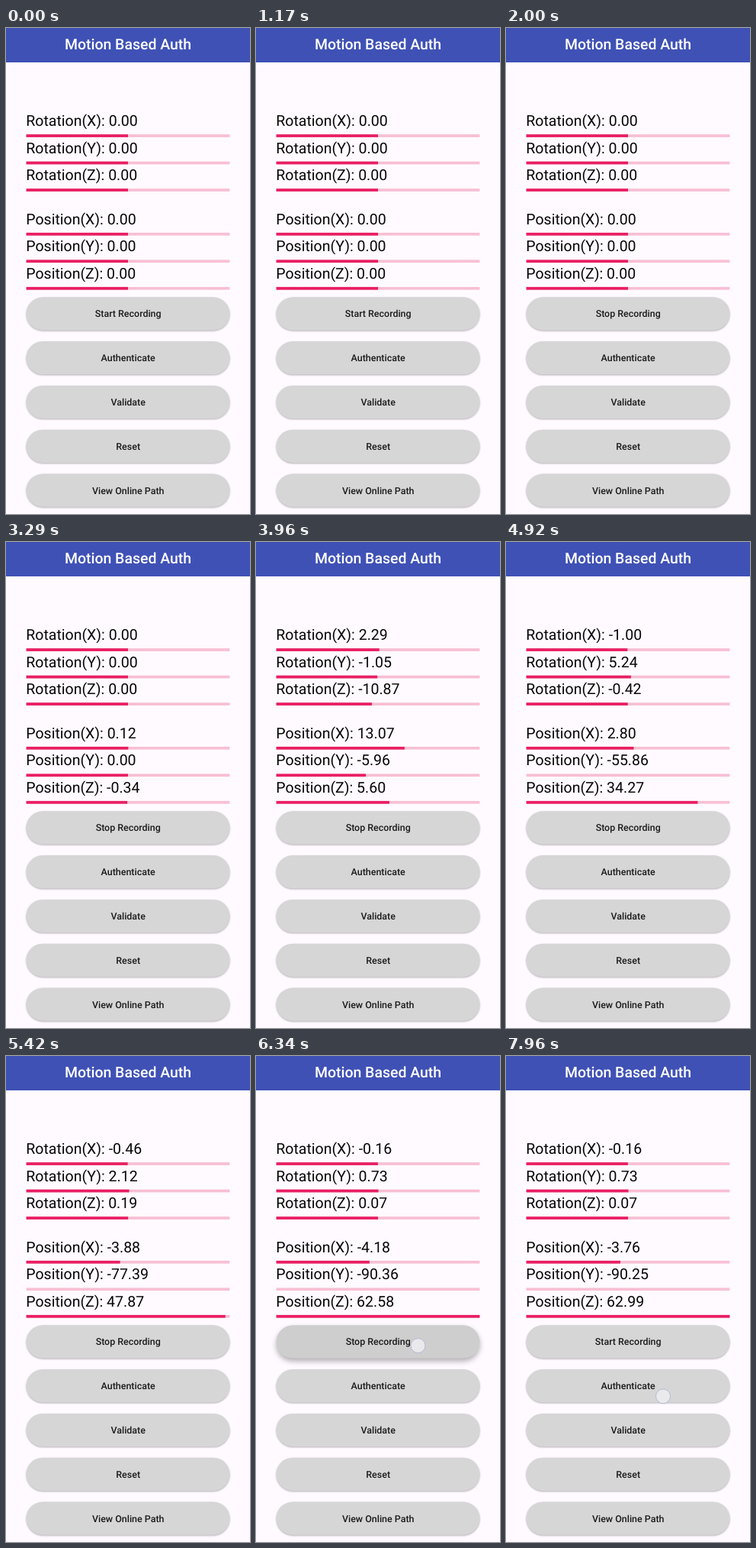
Recreate the animation shown at these times as an HTML page. Size 320x636 px, loop 8 s.

```html
<!DOCTYPE html>
<html lang="en">
<head>
<meta charset="utf-8">
<title>Motion Based Auth</title>
<style>
  html, body { margin: 0; height: 100%; overflow: hidden; background: #fffaff; }
  svg { display: block; width: 100vw; height: 100vh; font-family: Roboto, sans-serif; text-rendering: geometricPrecision; }
  .title { font-size: 19.45px; font-weight: 500; fill: #fff; text-anchor: middle; }
  .value { font-size: 19.5px; fill: #060606; }
  .label { font-size: 12.45px; font-weight: 500; fill: #1b1b1b; text-anchor: middle; }
  .button { fill: #d6d6d6; filter: drop-shadow(0 1px 1.3px rgba(0, 0, 0, .3)); }
</style>
</head>
<body>
<svg viewBox="0 0 320 636">
  <rect width="320" height="45" fill="#3f51b5"/>
  <text class="title" x="160" y="27.7">Motion Based Auth</text>
</svg>
<script>
const LOOP = 8000, STEP = 41.7;
const LEFT = 26.6, WIDTH = 266.8;
const svg = document.querySelector('svg');

function add(tag, attrs, text = '') {
  const el = document.createElementNS(svg.namespaceURI, tag);
  for (const name in attrs) el.setAttribute(name, attrs[name]);
  el.textContent = text;
  svg.append(el);
  return el;
}

// Each meter runs from -range to +range.
const meters = ['Rotation', 'Position'].flatMap((kind, group) =>
  ['X', 'Y', 'Z'].map((axis, i) => {
    const y = 128 + group * 128.7 + i * 35.5;
    const bar = { x: LEFT, y: y + 11.2, width: WIDTH, height: 3.7 };
    add('rect', { ...bar, fill: '#f8bfd4' });
    return {
      name: `${kind}(${axis}): `,
      range: group ? 50 : 180,
      bar: add('rect', { ...bar, fill: '#e91e63' }),
      text: add('text', { class: 'value', x: 26.3, y })
    };
  }));

const buttons = ['Start Recording', 'Authenticate', 'Validate', 'Reset', 'View Online Path']
  .map((name, i) => {
    const y = 352.3 + i * 57.8;
    return {
      rect: add('rect', { class: 'button', x: LEFT, y, width: WIDTH, height: 43.2, rx: 21.6 }),
      text: add('text', { class: 'label', x: 160.2, y: y + 26.1 }, name)
    };
  });
const record = buttons[0];
const dot = add('circle', { r: 9.5, fill: '#ececee', 'fill-opacity': .9, stroke: '#b4b9d6' });

// Step, then rotation x y z and position x y z
const keys = [
  [69, 0, 0, 0, 0, 0, 0],
  [79, 0, 0, 0, .12, 0, -.34],
  [84, 0, 0, 0, .9, -.2, .3],
  [92, 1.6, -.7, -7.4, 9.2, -3.6, 3.8],
  [104, 3.88, -1.94, -19.28, 22.43, -17.87, 12.95],
  [118, -1, 5.24, -.42, 2.8, -55.86, 34.27],
  [132, -.4, 1.8, .2, -4.1, -79.4, 49.6],
  [152, -.16, .73, .07, -4.18, -90.36, 62.58],
  [155, -.16, .73, .07, -3.76, -90.25, 62.99]
];

const taps = [
  { x: 212, y: 379, from: 34, to: 39, held: true },
  { x: 212.5, y: 379, from: 149, to: 155, held: true },
  { x: 206, y: 445.3, from: 188, to: 192 }
];

const clamp = (v, lo, hi) => Math.min(hi, Math.max(lo, v));

function slope(i, col) {
  if (i < 1 || i > keys.length - 2) return 0;
  const rate = j => (keys[j + 1][col] - keys[j][col]) / (keys[j + 1][0] - keys[j][0]);
  const a = rate(i - 1), b = rate(i);
  return a * b > 0 ? 2 * a * b / (a + b) : 0;
}

// Monotone cubic interpolation
function valueAt(step, col) {
  const last = keys.length - 1;
  if (step <= keys[0][0]) return keys[0][col];
  if (step >= keys[last][0]) return keys[last][col];
  const i = keys.findIndex(k => k[0] > step) - 1;
  const [a, b] = [keys[i], keys[i + 1]];
  const h = b[0] - a[0], u = (step - a[0]) / h, w = 1 - u;
  return a[col] * (1 + 2 * u) * w * w + b[col] * u * u * (3 - 2 * u)
    + h * u * w * (slope(i, col) * w - slope(i + 1, col) * u);
}

function draw(now) {
  const step = Math.floor(now % LOOP / STEP + .2);

  meters.forEach(({ name, range, bar, text }, i) => {
    const v = valueAt(step, i + 1);
    text.textContent = name + v.toFixed(2);
    bar.setAttribute('width', WIDTH * clamp((v / range + 1) / 2, 0, 1));
  });

  const recording = step >= taps[0].to && step < taps[1].to;
  record.text.textContent = (recording ? 'Stop' : 'Start') + ' Recording';

  let press = 0;
  for (const { from, to, held } of taps)
    if (held) press = Math.max(press, clamp(Math.min((step - from) / 3, (to + 2 - step) / 3), 0, 1));
  const gray = 214 - 8 * press;
  record.rect.style.fill = `rgb(${gray}, ${gray}, ${gray})`;
  record.rect.style.filter =
    `drop-shadow(0 ${1 + 3 * press}px ${1.3 + 2.5 * press}px rgba(0, 0, 0, .3))`;

  const tap = taps.find(({ from, to }) => step >= from && step < to);
  dot.style.display = tap ? '' : 'none';
  if (tap) {
    dot.setAttribute('cx', tap.x);
    dot.setAttribute('cy', tap.y);
  }
}

const start = performance.now();
function tick() {
  draw(performance.now() - start);
  requestAnimationFrame(tick);
}
tick();
</script>
</body>
</html>
```
